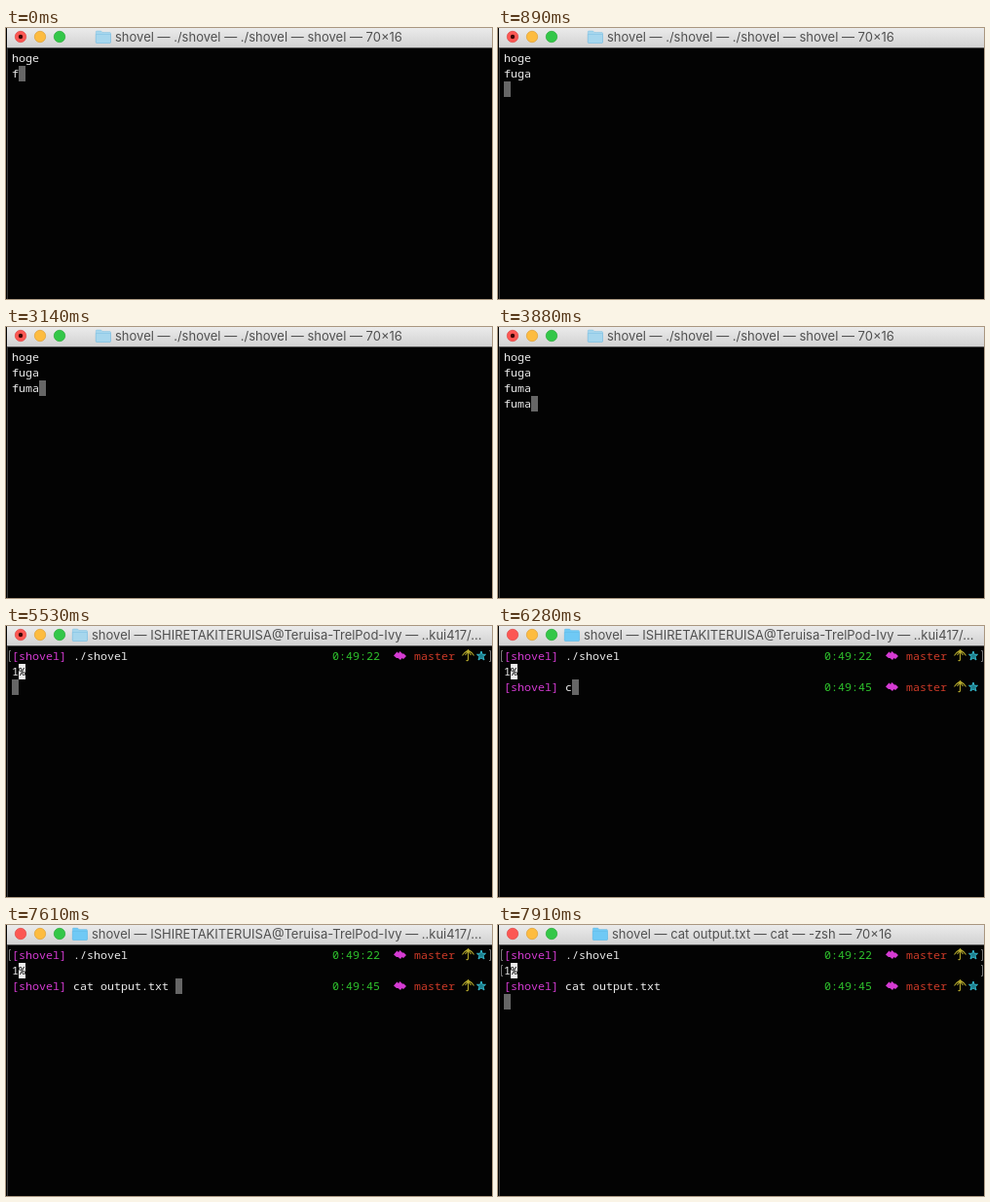
Write an HTML page that moves like this. It is 499x279 px and loops after 8 s.

```html
<!DOCTYPE html>
<html lang="en">
<head>
<meta charset="utf-8">
<title>Terminal</title>
<style>
  html, body { margin: 0; width: 100%; height: 100%; overflow: hidden; background: #030303; }
  svg { display: block; }
  text { white-space: pre; }
  .title { font: 13px Inter, Roboto, sans-serif; fill: #505050; }
  .cell { font: 11.667px "Noto Sans Mono", "Liberation Mono", monospace; }
</style>
</head>
<body>
<svg width="499" height="279" viewBox="0 0 499 279">
  <defs>
    <linearGradient id="bar" x2="0" y2="1">
      <stop offset="0" stop-color="#ebebeb"/>
      <stop offset="1" stop-color="#d2d2d2"/>
    </linearGradient>
    <g id="cloud">
      <path d="M0 7.500 3.500 3.500 5 5 6.500 3 9 5.500H10.500L13 8 10 11 8.500 10 7 12 4.500 10H3z" fill="#d53bd3"/>
    </g>
    <g id="umbrella" fill="none" stroke="#b3a82c" stroke-width="1.1">
      <path d="M.5 7.500 3 4.500 6.500 2 10 4.500l2.500 3M3.500 7 6.500 3l3 4M6.500 1v10.500q0 1.500-2 1"/>
    </g>
    <g id="star" fill="#1d7f8d" stroke="#33b5c8">
      <path d="M6 3 7.200 6.300H10.500L8 8.500 9 12 6 10 3 12 4 8.500 1.500 6.300H4.800z"/>
    </g>
  </defs>
  <rect width="499" height="279" fill="#030303"/>
  <rect x="1" y="21" width="1" height="258" fill="#383838"/>
  <rect x="1" width="498" height="20" fill="url(#bar)"/>
  <rect x="1" y="20" width="498" height="1" fill="#555"/>
  <g stroke-width=".7">
    <circle cx="15" cy="9" r="5.700" fill="#fc5753" stroke="#df4744"/>
    <circle cx="35" cy="9" r="5.700" fill="#fdbc40" stroke="#de9f34"/>
    <circle cx="55" cy="9" r="5.700" fill="#33c748" stroke="#27aa35"/>
  </g>
  <circle id="busy" cx="15" cy="9" r="2.200" fill="#3d0604"/>
  <g id="folder" stroke="#5aaedb" stroke-opacity=".5" stroke-width=".6">
    <path d="M.3 4q0-1 1-1h4.200l1.500 1.500h7.500q1 0 1 1V14.500q0 1-1 1H1.300q-1 0-1-1z"/>
    <path d="M.3 6.500h15.200V14.500q0 1-1 1H1.300q-1 0-1-1z"/>
  </g>
  <text id="title" class="title" y="14"></text>
  <g id="screen"></g>
</svg>
<script>
const LOOP = 8000, COL = 7, ROW = 16, LEFT = 6, TOP = 23;
const WHITE = '#ececec', MAGENTA = '#d53bd3', GREEN = '#2fc42d', RED = '#cb3a28';
const APP = 'shovel';

const titles = {
  run: { x: 112, text: `${APP} — ./${APP} — ./${APP} — ${APP} — 70×16` },
  shell: { x: 88, text: `${APP} — ISHIRETAKITERUISA@Teruisa-TrelPod-Ivy — ..kui417/…` },
  cat: { x: 117, text: `${APP} — cat output.txt — cat — -zsh — 70×16` }
};

// Input to the running program: time, visible lines
const input = [
  [0, 'hoge\nf'], [150, 'hoge\nfu'], [290, 'hoge\nfug'], [440, 'hoge\nfuga'],
  [890, 'hoge\nfuga\n'],
  [1640, 'hoge\nfuga\nf'], [1790, 'hoge\nfuga\nfu'], [1940, 'hoge\nfuga\nfun'],
  [2090, 'hoge\nfuga\nfuna'], [2690, 'hoge\nfuga\nfu'],
  [2990, 'hoge\nfuga\nfum'], [3140, 'hoge\nfuga\nfuma'], [3290, 'hoge\nfuga\nfuma\n'],
  [3580, 'hoge\nfuga\nfuma\nf'], [3730, 'hoge\nfuga\nfuma\nfu'], [3880, 'hoge\nfuga\nfuma\nfuma']
].map(([t, text]) => ({ t, text, title: 'run' }));

// Shell: time, command on the second prompt (null before it appears)
const shell = [
  [5530, null], [5680, ''], [5830, ''],
  [6280, 'c'], [6430, 'ca'], [6570, 'cat'], [6870, 'cat '],
  [7460, 'cat o'], [7610, 'cat output.txt '], [7910, 'cat output.txt\n']
].map(([t, cmd]) => ({ t, cmd, title: t < 7910 ? 'shell' : 'cat', idle: t >= 5830 }));

const steps = [...input, ...shell];
const $ = id => document.getElementById(id);
const px = col => LEFT + col * COL;
const py = row => TOP + row * ROW;

const type = (col, row, str, fill = WHITE) =>
  `<text class="cell" x="${px(col)}" y="${py(row) + 12}" fill="${fill}">${str}</text>`;
const block = (col, row, fill) =>
  `<rect x="${px(col)}" y="${py(row)}" width="${COL}" height="${ROW}" fill="${fill}"/>`;
const cursor = (col, row) => block(col, row, '#666');
const icon = (id, col, row) => `<use href="#${id}" x="${px(col)}" y="${py(row)}"/>`;

// Small line marks in both margins
const marks = row => {
  const y = py(row) + 2.5;
  return `<path d="M5 ${y}H3.500v11H5M496 ${y}h1.500v11H496" fill="none" stroke="#777"/>`;
};

const prompt = (row, time, cmd) =>
  type(0, row, `[${APP}]`, MAGENTA) + type(9, row, cmd) + type(47, row, time, GREEN) +
  icon('cloud', 56, row) + type(59, row, 'master', RED) +
  icon('umbrella', 66, row) + icon('star', 68, row);

function drawInput(text) {
  const lines = text.split('\n'), last = lines.length - 1;
  return cursor(lines[last].length, last) + lines.map((s, i) => type(0, i, s)).join('');
}

function drawShell({ cmd, title }) {
  const sent = title === 'cat';
  let out = marks(0) + prompt(0, '0:49:22', `./${APP}`) + type(0, 1, '1') +
    block(1, 1, WHITE) + type(1, 1, '%', '#000');
  if (sent) out += marks(1);
  if (cmd === null) return out + cursor(0, 2);
  out += sent ? cursor(0, 3) : cursor(9 + cmd.length, 2);
  return out + prompt(2, '0:49:45', cmd.trimEnd());
}

function show(step) {
  const { x, text } = titles[step.title];
  $('title').textContent = text;
  $('title').setAttribute('x', x);
  $('folder').setAttribute('transform', `translate(${x - 20} 0)`);
  $('folder').setAttribute('fill', step.idle ? '#6fc9f5' : '#a6d6ed');
  $('busy').style.display = step.idle ? 'none' : '';
  $('screen').innerHTML = step.text ? drawInput(step.text) : drawShell(step);
}

let shown;
function tick() {
  const t = performance.now() % LOOP;
  const step = steps.findLast(s => s.t <= t);
  if (step !== shown) show(shown = step);
  requestAnimationFrame(tick);
}
tick();
</script>
</body>
</html>
```
